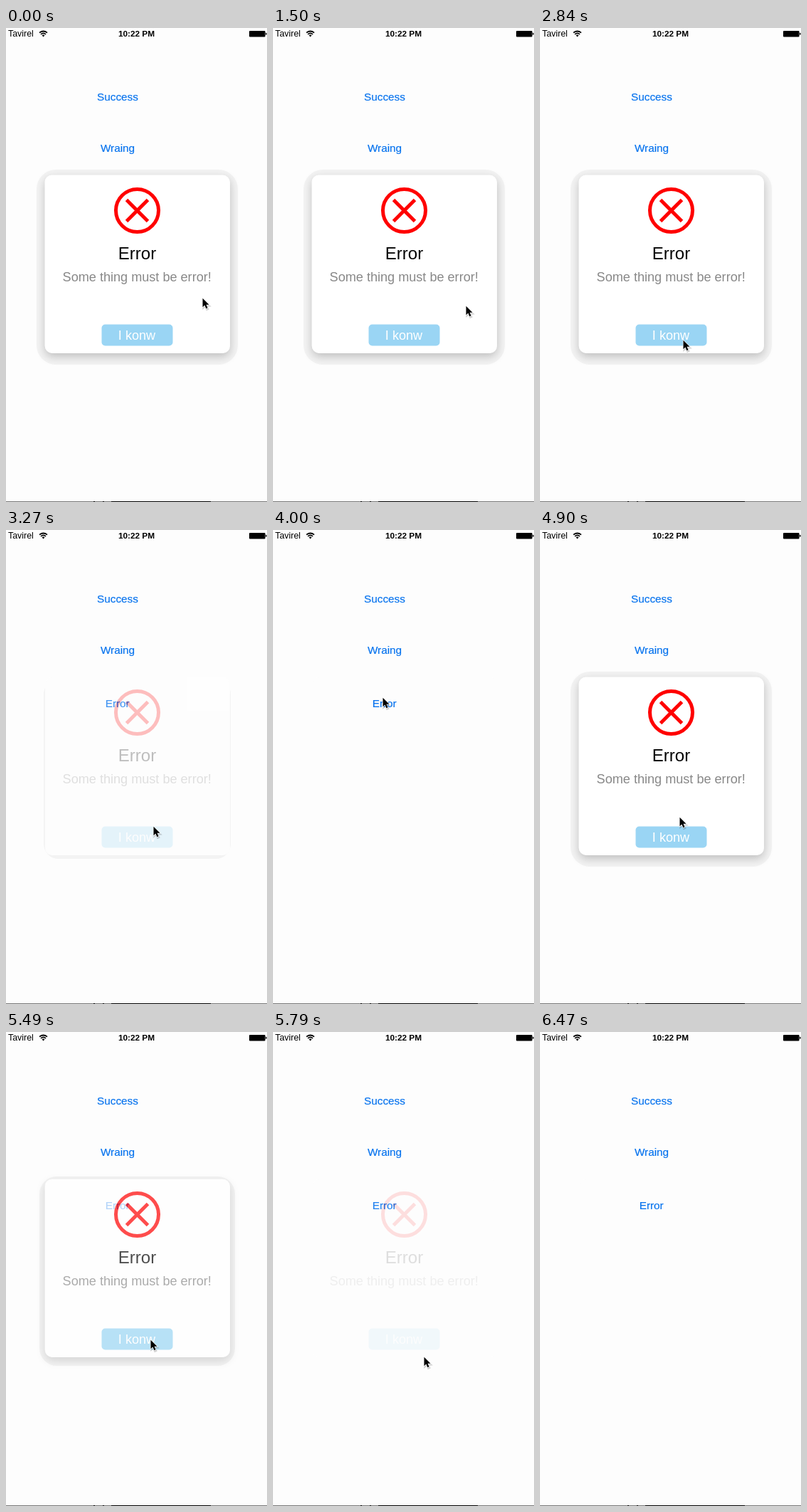
Write an HTML page that moves like this. It is 367 by 666 pixels and loops after 6490 ms.

```html
<!DOCTYPE html>
<html lang="en">
<head>
<meta charset="utf-8">
<title>Alert dialog</title>
<style>
  html, body { margin: 0; width: 100%; height: 100%; overflow: hidden; background: #fdfdfd; }
  #stage { position: relative; width: 367px; height: 666px; overflow: hidden; }
  #stage > * { position: absolute; }
  svg { left: 0; top: 0; }
  #halo { background: #f3f3f3; }
  #plate { left: 54.5px; top: 206.5px; width: 260px; height: 250px; border-radius: 10px; background: #fdfdfd; }
  text { font-family: "Liberation Sans", Arial, sans-serif; text-anchor: middle; }
  .link { font-size: 15.3px; fill: #0773ee; stroke: #0773ee; stroke-width: .2; }
  .body { font-size: 18.1px; }
  #mark { fill: none; stroke: #f00; stroke-width: 5; }
</style>
</head>
<body>
<div id="stage">
  <div id="halo"></div>
  <div id="plate"></div>
  <svg width="367" height="666" viewBox="0 0 367 666">
    <g id="status">
      <text x="3" y="12.2" font-size="12.4" style="text-anchor:start">Tavirel</text>
      <g fill="none" stroke="#000" stroke-width="1.7">
        <path d="M47 6.7Q52.5 2.3 58 6.7"/>
        <path d="M49 8.9Q52.5 6 56 8.9"/>
      </g>
      <path d="M50.5 10.3Q52.5 8.7 54.5 10.3L52.5 12.4Z"/>
      <text x="183.5" y="12.2" font-size="11.8" font-weight="bold">10:22 PM</text>
      <rect x="342" y="4" width="22.5" height="8.5" rx="1"/>
      <path d="M365 6.5q1.5 .3 1.5 1.7t-1.5 1.7z"/>
    </g>

    <text class="link" x="157" y="101.5">Success</text>
    <text class="link" x="157" y="173.5">Wraing</text>
    <text class="link" x="156.7" y="249">Error</text>

    <path d="M0 665.5H367" stroke="#777"/>
    <path d="M123 665.5h2m11 0h2m10 0h140" stroke="#000"/>

    <g id="card">
      <rect x="54.5" y="206.5" width="260" height="250" rx="10" fill="#fff"/>
      <g id="mark">
        <circle cx="184.5" cy="256.5" r="30"/>
        <path d="M169.5 241.5l30 30"/>
        <path d="M199.5 241.5l-30 30"/>
      </g>
      <text x="184.5" y="325" font-size="24">Error</text>
      <text class="body" x="184.2" y="355.5" fill="#888">Some thing must be error!</text>
      <rect x="134.5" y="416.5" width="100" height="30" rx="5" fill="#9ad5f4"/>
      <text class="body" x="184" y="437.7" fill="#fff">I konw</text>
    </g>

    <g id="cursor">
      <path d="M1 2V17l3.4-3.2 2.6 5.8 2.6-1.1-2.5-5.6h4.8z" fill="none" stroke="#000" stroke-opacity=".18" stroke-width="2.5"/>
      <path d="M0 0V15.2l3.5-3.3 2.5 5.7 2.6-1.1-2.5-5.5h4.9z" stroke="#fff" stroke-width="1.6" paint-order="stroke"/>
    </g>
  </svg>
</div>
<script>
  const LOOP = 6490;
  const FADE_TIME = 400, DRAW_TIME = 425;
  const CLOSE = 3000, OPEN = 4150, CLOSE_AGAIN = 5342;

  // The picture is refreshed in bursts and rests in between
  const BURSTS = [[1500, 2540, 8], [2690, 2840, 2], [3120, 4150, 8], [4300, 5050, 6], [5490, 6470, 7]];

  // Pointer moves; bend is how far the path bows sideways
  const HOME = [276, 379];
  const MOVES = [
    { from: 1300, to: 2540, end: [189, 449], bend: [0, 12] },
    { from: 2540, to: 2840, end: [201, 438], bend: [0, 0] },
    { from: 3120, to: 4000, end: [154, 235], bend: [16, -15] },
    { from: 4450, to: 5050, end: [203, 432], bend: [0, 0] },
    { from: 5490, to: 6300, end: [300, 680], bend: [0, 0] }
  ];

  const byId = id => document.getElementById(id);
  const [card, halo, plate, cursor] = ['card', 'halo', 'plate', 'cursor'].map(byId);
  const strokes = [...byId('mark').children].map(el => ({ el, len: el.getTotalLength() }));
  const total = strokes.reduce((sum, s) => sum + s.len, 0);

  const phase = (t, from, length) => Math.max(0, Math.min(1, (t - from) / length));
  const ease = p => (1 - Math.cos(Math.PI * p)) / 2;
  const fade = (t, from) => ease(phase(t, from, FADE_TIME));

  function snap(t) {
    const burst = BURSTS.filter(b => b[0] <= t).pop();
    if (!burst) return 0;
    const [from, to, count] = burst;
    const step = (to - from) / (count - 1);
    return from + Math.floor((Math.min(t, to) - from) / step + .02) * step;
  }

  function pointerAt(t) {
    return MOVES.reduce((pos, { from, to, end, bend }) => {
      const p = phase(t, from, to - from);
      return pos.map((v, i) => v + (end[i] - v) * ease(p) + bend[i] * 4 * p * (1 - p));
    }, HOME);
  }

  function drawMark(progress) {
    let left = progress * total;
    for (const { el, len } of strokes) {
      const part = Math.max(0, Math.min(len, left));
      el.style.visibility = part > 0 ? 'inherit' : 'hidden';
      el.style.strokeDasharray = part < len ? `${part} 999` : 'none';
      left -= len;
    }
  }

  function drawShadow(alpha) {
    const spread = 14 * alpha - 2.2;
    halo.style.visibility = spread > 0 ? 'visible' : 'hidden';
    halo.style.left = `${54.5 - spread}px`;
    halo.style.top = `${211 - spread}px`;
    halo.style.width = `${260 + 2 * spread}px`;
    halo.style.height = `${250 + 2 * spread}px`;
    halo.style.borderRadius = `${20 + spread * .6}px`;
    plate.style.boxShadow = `0 4.5px 13px rgba(0,0,0,${Math.max(0, alpha - .25) * .3})`;
  }

  function render(now) {
    const t = snap(now % LOOP);
    const [x, y] = pointerAt(t).map(Math.round);
    const alpha = 1 - fade(t, CLOSE) + fade(t, OPEN) - fade(t, CLOSE_AGAIN);

    cursor.setAttribute('transform', `translate(${x + .5} ${y + .8}) scale(.82)`);
    card.style.opacity = alpha;
    drawShadow(alpha);
    drawMark(t < OPEN ? 1 : phase(t, OPEN, DRAW_TIME));
  }

  const start = performance.now();
  function tick() {
    render(performance.now() - start);
    requestAnimationFrame(tick);
  }
  tick();
</script>
</body>
</html>
```
